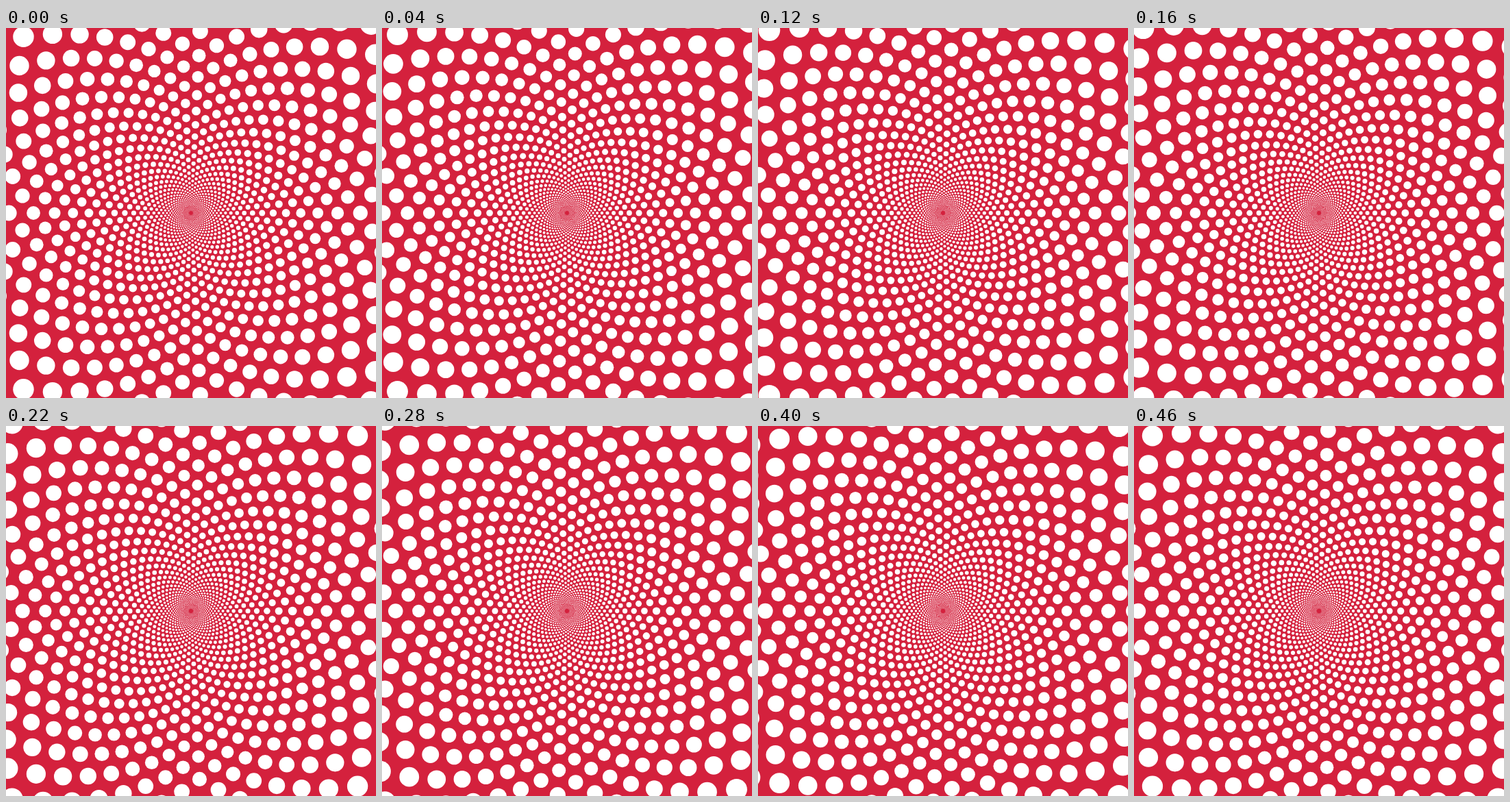
Animation, 540 px wide and 540 px high, one loop 0.48 s. Source, as an HTML page with a canvas:

```html
<!DOCTYPE html>
<html lang="en">
<head>
<meta charset="utf-8">
<title>Endless dot zoom</title>
<style>
  html, body { margin: 0; width: 100%; height: 100%; overflow: hidden; background: #d4213d; }
  canvas { display: block; width: 540px; height: 540px; }
</style>
</head>
<body>
<canvas id="stage" width="540" height="540"></canvas>
<script>
const ctx = document.getElementById('stage').getContext('2d');
const SIZE = 540, CENTER = SIZE / 2;
const LOOP = 480, STEP = 20;
const RAYS = 31;           // dots per ring
const GROWTH = 1.075;      // radius ratio of neighbouring rings
const BASE_RADIUS = 199;   // radius of ring 0 when the loop starts
const DOT_RATIO = 0.043;   // dot radius relative to ring radius
const FIRST_RING = -58, LAST_RING = 10;

function drawDot(x, y, radius) {
  if (Math.max(Math.abs(x), Math.abs(y)) > CENTER + radius + 1) return;
  ctx.beginPath();
  ctx.arc(CENTER + x, CENTER + y, radius, 0, Math.PI * 2);
  ctx.fill();
}

function drawRing(ring, shift) {
  const radius = BASE_RADIUS * GROWTH ** (ring + shift);
  // every other ring is turned by half a step
  for (let i = 0; i < RAYS; i++) {
    const angle = (2 * i + 1 + ring) * Math.PI / RAYS;
    drawDot(radius * Math.cos(angle), radius * Math.sin(angle), radius * DOT_RATIO);
  }
}

function draw(time) {
  const progress = Math.floor((time % LOOP) / STEP) * STEP / LOOP;
  ctx.fillStyle = '#d4213d';
  ctx.fillRect(0, 0, SIZE, SIZE);
  ctx.fillStyle = '#fff';
  // two rings per loop bring the pattern back onto itself
  for (let ring = FIRST_RING; ring <= LAST_RING; ring++) drawRing(ring, 2 * progress);
}

let start;
function tick(now) {
  start ??= now;
  draw(Math.max(0, now - start));
  requestAnimationFrame(tick);
}
draw(0);
requestAnimationFrame(tick);
</script>
</body>
</html>
```
